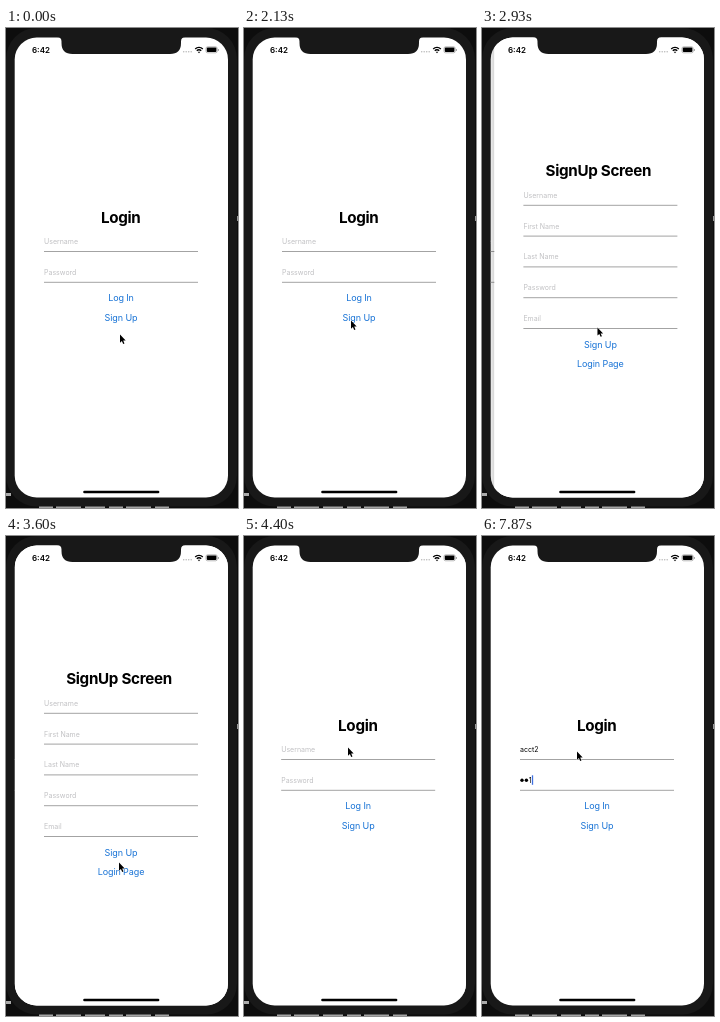
These frames come from a looping animation (232x480 px, 8 s). An HTML page:

```html
<!DOCTYPE html>
<html lang="en">
<head>
<meta charset="utf-8">
<title>Login flow</title>
<style>
html, body { margin: 0; width: 100%; height: 100%; overflow: hidden; background: #161616; }
svg { display: block; width: 232px; height: 480px; }
text { font-family: Inter, "Liberation Sans", sans-serif; font-size: 7px; fill: #000; white-space: pre; }
.title { font-size: 15.2px; font-weight: 700; letter-spacing: -.3px; text-anchor: middle; }
.link { font-size: 9px; letter-spacing: -.1px; fill: #1a74d6; text-anchor: middle; }
.hint { fill: #c0c0c3; }
.rule { fill: #a3a3a3; }
.clock { font-size: 8px; font-weight: 600; }
</style>
</head>
<body>
<svg viewBox="0 0 232 480">
  <defs>
    <clipPath id="glass"><rect x="8.700" y="9.500" width="213.300" height="460" rx="22"/></clipPath>
    <linearGradient id="shade">
      <stop offset="0" stop-color="#000" stop-opacity="0"/>
      <stop offset="1" stop-color="#000" stop-opacity=".17"/>
    </linearGradient>
  </defs>

  <rect width="232" height="480" fill="#0d0d0d"/>
  <path d="M33 479h130" stroke="#a5a5a5" stroke-width="2" stroke-dasharray="14 3 25 4 20 4"/>
  <rect y="465" width="5" height="3" fill="#aaa"/>
  <rect width="231" height="478.500" rx="31" fill="#181818"/>
  <rect x="231" y="188" width="1" height="5" fill="#999"/>

  <g clip-path="url(#glass)">
    <rect x="8" y="9" width="215" height="461" fill="#fff"/>
    <g id="login"></g>
    <g id="signup">
      <rect id="edge" x="2" y="9" width="7" height="461" fill="url(#shade)"/>
      <rect x="9" y="9" width="214" height="461" fill="#fff"/>
    </g>
  </g>
  <path d="M51 8V9q4.500 0 4.500 4.500V15q0 11 11 11H164q11 0 11-11V13.500q0-4.500 4.500-4.500V8z" fill="#181818"/>

  <text class="clock" x="26" y="25">6:42</text>
  <path d="M177.700 23.700h8" stroke="#bbb" stroke-width="1.600" stroke-linecap="round" stroke-dasharray="0 2.500"/>
  <g fill="none" stroke="#000" stroke-width="1.400">
    <path d="M189.200 20.900a5.400 5.400 0 0 1 7.600 0M190.800 22.700a3.100 3.100 0 0 1 4.400 0"/>
    <circle cx="193" cy="24.300" r=".5" stroke-width=".8"/>
  </g>
  <rect x="200" y="18.800" width="11.200" height="6" rx="1.600" fill="none" stroke="#888" stroke-width=".6"/>
  <rect x="200.800" y="19.600" width="9.600" height="4.400" rx=".9"/>
  <rect x="211.900" y="20.900" width=".9" height="2" rx=".4" fill="#888"/>
  <rect x="77.200" y="462.800" width="76.200" height="2.500" rx="1.250"/>

  <g id="cursor">
    <path transform="translate(0 .6) scale(.86)" d="M0 0V9.500L2.200 7.500 3.700 10.900 5.200 10.300 3.700 7H6.600Z" stroke="#fff" stroke-width=".7" paint-order="stroke"/>
  </g>
</svg>

<script>
const LOOP = 8000, TICK = 200 / 3, WIDTH = 213, LEFT = 38, ROW = 30.8;
const USER = "acct2", SECRET = "111", DOT_STEP = 4.4;
const PUSH = 2599, POP = 4053;          // page transitions
const SIGN_TAP = 2470, BACK_TAP = 3820; // link presses
const FOCUS = 260, REFOCUS = 4860, TYPE = 5860, PASS_FOCUS = 6733;
const PASS_KEYS = [7066, 7133, 7733];

// Cursor moves: leave, arrive, x, y
const HOME = [114, 306];
const MOVES = [
  [133, 333, 133, 311],
  [600, 1533, 113, 271],
  [1667, 1933, 114, 295],
  [2067, 2133, 107, 292],
  [2133, 2333, 113, 286],
  [2733, 3467, 122, 333],
  [3467, 3600, 113, 326],
  [4000, 4400, 104, 211],
  [4400, 4667, 95, 215]
];

const $ = id => document.getElementById(id);
const clamp = v => Math.min(1, Math.max(0, v));
const set = (el, attrs) => { for (const key in attrs) el.setAttribute(key, attrs[key]); };
const shift = (el, x, y = 0) => set(el, { transform: `translate(${x.toFixed(2)} ${y.toFixed(2)})` });

function add(parent, tag, attrs, text = "") {
  const el = document.createElementNS("http://www.w3.org/2000/svg", tag);
  set(el, attrs);
  el.textContent = text;
  return parent.appendChild(el);
}

const label = (page, cls, x, y, text) => add(page, "text", { class: cls, x, y }, text);

function fields(page, top, names) {
  return names.map((name, i) => {
    const y = top + i * ROW;
    add(page, "rect", { class: "rule", x: LEFT, y: y + 7, width: 154, height: 1 });
    return label(page, "hint", LEFT, y, name);
  });
}

// Screens
const login = $("login"), signup = $("signup"), cursor = $("cursor");
label(login, "title", 114.7, 194.5, "Login");
const [userHint, passHint] = fields(login, 216, ["Username", "Password"]);
label(login, "link", 115, 273.3, "Log In");
const signLink = label(login, "link", 115, 292.5, "Sign Up");
const userText = label(login, "", LEFT, 216, "");
const passText = label(login, "", LEFT, 216 + ROW, "");
const dots = [0, 1].map(i => add(login, "circle", { cx: LEFT + 2 + i * DOT_STEP, cy: 244.3, r: 1.7 }));
const caret = add(login, "rect", { width: 1.3, height: 9.5, fill: "#3f70e0" });

label(signup, "title", 113, 148.2, "SignUp Screen");
fields(signup, 169.8, ["Username", "First Name", "Last Name", "Password", "Email"]);
label(signup, "link", 115, 319.5, "Sign Up");
const backLink = label(signup, "link", 115, 338.8, "Login Page");

// Critically damped spring, stiffness 1000 and mass 3
function remaining(ms) {
  const x = Math.max(0, ms) / 1000 * Math.sqrt(1000 / 3);
  return (1 + x) * Math.exp(-x);
}

// Quick dim on touch, slower return
const press = u => 1 - .8 * clamp(u / 70) * clamp((400 - u) / 260);

// Soft square wave, one second long
const blink = u => clamp(.5 + 2.5 * Math.cos((u - 240) / 1000 * 2 * Math.PI));

function caretOpacity(t) {
  if (t >= TYPE) return 1;
  if (t >= REFOCUS) return blink(t - REFOCUS);
  return t < PUSH ? blink(t - FOCUS) : 0;
}

function cursorAt(t) {
  let [x, y] = HOME;
  for (const [leave, arrive, toX, toY] of MOVES) {
    const k = clamp((t - leave) / (arrive - leave));
    x += (toX - x) * k;
    y += (toY - y) * k;
  }
  return [x, y];
}

function typeFields(t) {
  const chars = t < TYPE ? 0 : 1 + Math.floor((t - TYPE) / (2 * TICK));
  const secret = PASS_KEYS.filter(k => k <= t).length;
  const hidden = Math.max(0, secret - 1);

  userText.textContent = USER.slice(0, chars);
  passText.textContent = SECRET.slice(hidden, secret);
  set(passText, { x: LEFT + hidden * DOT_STEP });
  set(userHint, { opacity: chars ? 0 : 1 });
  set(passHint, { opacity: secret ? 0 : 1 });
  dots.forEach((dot, i) => set(dot, { opacity: i < hidden ? 1 : 0 }));

  const inPass = t >= PASS_FOCUS, text = inPass ? passText : userText;
  const end = text.textContent ? text.getComputedTextLength() : 0;
  set(caret, {
    x: LEFT + .2 + end + (inPass ? hidden * DOT_STEP : 0),
    y: 208.5 + (inPass ? ROW : 0),
    opacity: caretOpacity(t)
  });
}

function draw(t) {
  const open = t < POP ? 1 - remaining(t - PUSH) : remaining(t - POP);
  shift(login, -.3 * WIDTH * open);
  shift(signup, WIDTH * (1 - open));
  set(signup, { visibility: open > .001 ? "visible" : "hidden" });
  set($("edge"), { opacity: open });
  set(signLink, { opacity: press(t - SIGN_TAP) });
  set(backLink, { opacity: press(t - BACK_TAP) });
  typeFields(t);
  shift(cursor, ...cursorAt(t));
}

const start = performance.now();
function frame() {
  const t = (performance.now() - start) % LOOP;
  draw(Math.floor((t + 5) / TICK) * TICK);
  requestAnimationFrame(frame);
}
frame();
</script>
</body>
</html>
```
